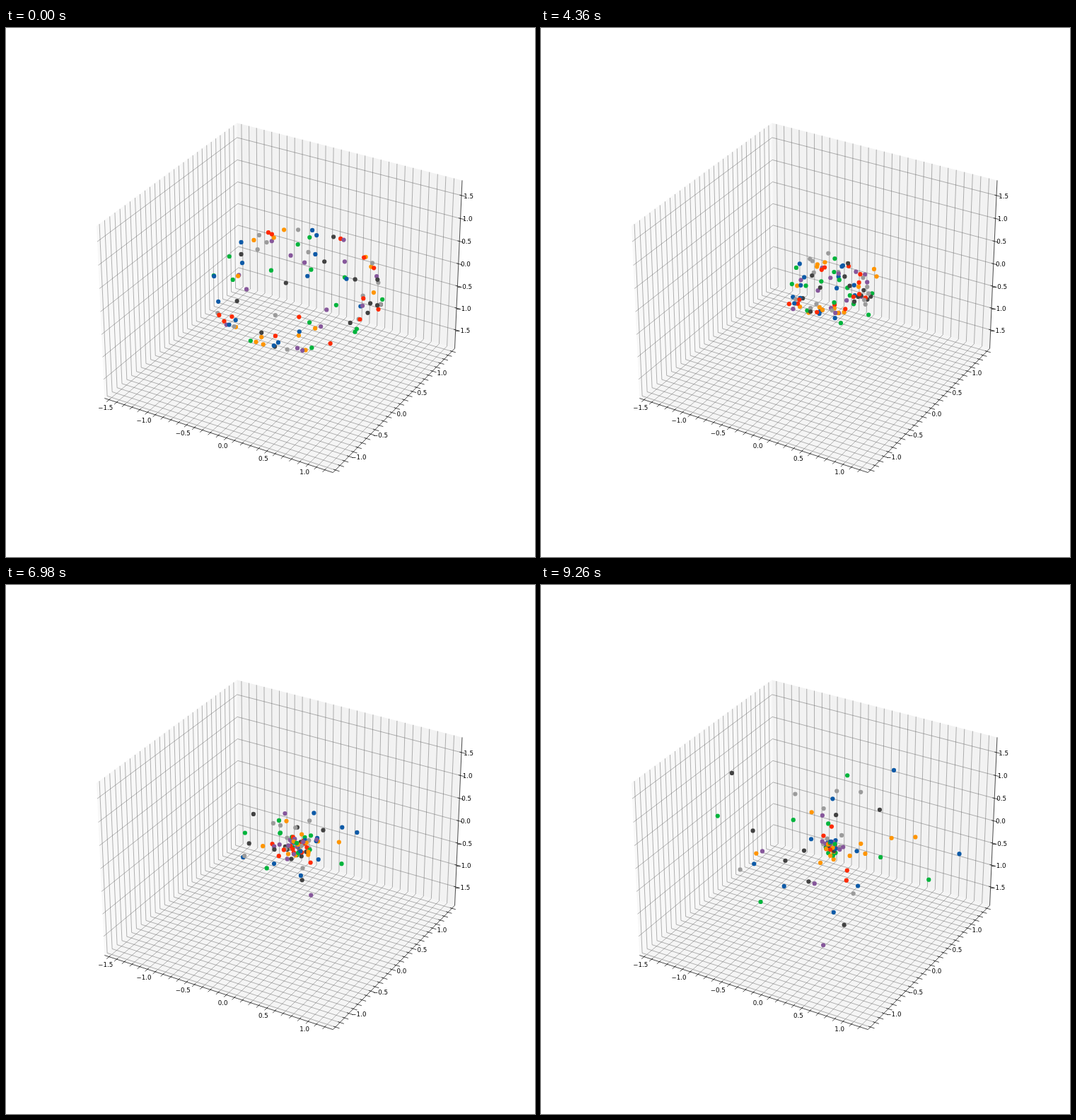
Animation, 748 px wide and 748 px high, one loop 9280 ms. Source, as an HTML page with a canvas:

```html
<!DOCTYPE html>
<html>
<head>
<meta charset="utf-8">
<style>
  html, body { margin: 0; width: 100%; height: 100%; overflow: hidden; background: #fff; }
  canvas { display: block; }
</style>
</head>
<body>
<canvas id="stage" width="748" height="748"></canvas>
<script>
const ctx = document.getElementById('stage').getContext('2d');
const LOOP = 9280;
const COLORS = ['#00b43c', '#0d5aa7', '#86579b', '#ff9500', '#424242', '#9b9b9b', '#ff2a00'];
const clamp = v => Math.min(1, Math.max(0, v));
const mix = (a, b, t) => a + (b - a) * t;

// Perspective box, seen from elevation 30 and azimuth -60; a, b, c run from 0 to 1.
function project(a, b, c) {
  const x = (a - .5) * 1.1434, y = (b - .5) * 1.1434, z = (c - .5) * .8575;
  const k = 3238 / (10 - (.433 * x - .75 * y + .5 * z));
  return [391.3 + k * (.866 * x + .5 * y), 370 - k * (-.25 * x + .433 * y + .866 * z)];
}

function trace(points, width, color) {
  ctx.beginPath();
  points.forEach(p => ctx.lineTo(...project(...p)));
  ctx.lineWidth = width;
  ctx.strokeStyle = color;
  ctx.stroke();
}

function pane(color, ...corners) {
  ctx.beginPath();
  corners.forEach(p => ctx.lineTo(...project(...p)));
  ctx.fillStyle = color;
  ctx.fill();
}

const axes = [
  { min: -1.56, max: 1.298, step: .1, dx: -5, dy: 12,
    at: f => [f, 0, 0], out: [0, -1, 0],
    grid: f => [[f, 0, 0], [f, 1, 0], [f, 1, 1]] },
  { min: -1.455, max: 1.475, step: .1, dx: 7.8, dy: 8.8,
    at: f => [1, f, 0], out: [1, 0, 0],
    grid: f => [[1, f, 0], [0, f, 0], [0, f, 1]] },
  { min: -1.93, max: 1.826, step: .5, dx: 10, dy: 1.5,
    at: f => [1, 1, f], out: [1, 0, 0],
    grid: f => [[0, 0, f], [0, 1, f], [1, 1, f]] }
];
const fraction = (axis, value) => (value - axis.min) / (axis.max - axis.min);

function eachTick(axis, draw) {
  const last = Math.floor(axis.max / axis.step);
  for (let i = Math.ceil(axis.min / axis.step); i <= last; i++) {
    draw(fraction(axis, i * axis.step), i * axis.step);
  }
}

function drawBox() {
  ctx.fillStyle = '#fff';
  ctx.fillRect(0, 0, 748, 748);
  pane('#f8f8f8', [0, 0, 0], [0, 1, 0], [0, 1, 1], [0, 0, 1]);
  pane('#f2f2f2', [0, 1, 0], [1, 1, 0], [1, 1, 1], [0, 1, 1]);
  pane('#f5f5f5', [0, 0, 0], [1, 0, 0], [1, 1, 0], [0, 1, 0]);
  for (const axis of axes) {
    eachTick(axis, f => trace(axis.grid(f), .5, '#666'));
  }
  ctx.font = '8.66px "DejaVu Sans", sans-serif';
  ctx.textAlign = 'center';
  ctx.textBaseline = 'middle';
  for (const axis of axes) {
    trace([axis.at(0), axis.at(1)], .7, '#000');
    eachTick(axis, (f, value) => {
      const p = axis.at(f);
      const shift = s => p.map((v, i) => v + s * axis.out[i]);
      trace([shift(-.1 / 12), shift(.2 / 12)], .7, '#000');
      const halves = value * 2;
      if (Math.abs(halves - Math.round(halves)) > .01) return;
      const [x, y] = project(...p);
      const sign = halves < -.01 ? '\u2212' : '';
      ctx.fillStyle = '#000';
      ctx.fillText(sign + Math.abs(value).toFixed(1), x + axis.dx, y + axis.dy);
    });
  }
}

let seed = 2024;
function random() {
  seed = (seed * 16807) % 2147483647;
  return seed / 2147483647;
}

function onSphere(z, turn) {
  const r = Math.sqrt(1 - z * z);
  return [r * Math.cos(turn), r * Math.sin(turn), z];
}
const anyDirection = () => onSphere(2 * random() - 1, 2 * Math.PI * random());

// Dots rest on a sphere; about half of them shoot out on the far side after the collapse.
const COUNT = 100;
const dots = Array.from({ length: COUNT }, (_, i) => {
  const start = onSphere(1 - 2 * (i + random()) / COUNT, 2 * Math.PI * random());
  const scatter = anyDirection();
  const exit = start.map((v, k) => .9 * scatter[k] - v);
  const reach = random() < .52 ? .2 + 1.6 * random() : 0;
  const scale = reach / Math.hypot(...exit);
  return {
    color: COLORS[i % COLORS.length],
    start: start.map(v => .95 * v),
    exit: exit.map(v => v * scale),
    fall: 105 + 20 * random() ** 2,
    swing: .3 + random(),
    phases: start.map(() => 7 * random()),
    spin: .24 * (random() - .5)
  };
});

// Free fall from rest: 1 at the start, 0 at the centre.
function freeFall(part) {
  if (part >= 1) return 0;
  let lo = 0, hi = Math.PI / 2;
  for (let i = 0; i < 24; i++) {
    const mid = (lo + hi) / 2;
    if (mid + Math.sin(2 * mid) / 2 < part * Math.PI / 2) lo = mid; else hi = mid;
  }
  return Math.cos(lo) ** 2;
}

function drawDot(dot, step) {
  const fall = freeFall(step / dot.fall);
  const away = clamp((step - 111) / 88) ** .9;
  const stir = clamp((step - 82) / 36);
  const core = stir * stir * (3 - 2 * stir) * mix(.21, .08, clamp((step - 125) / 60));
  const place = axes.map((axis, k) => {
    const wobble = core * dot.swing * Math.sin(dot.phases[k] + dot.spin * step);
    return fraction(axis, .03 + dot.start[k] * fall + dot.exit[k] * away + wobble);
  });
  ctx.beginPath();
  ctx.arc(...project(...place), 3.1, 0, 2 * Math.PI);
  ctx.fillStyle = dot.color;
  ctx.fill();
}

// Three steps every 140 ms, held for 20, 100 and 20 ms.
function stepAt(ms) {
  const rest = ms % 140;
  return 3 * Math.floor(ms / 140) + (rest < 20 ? 0 : rest < 120 ? 1 : 2);
}

const begin = performance.now();
function frame() {
  const step = stepAt((performance.now() - begin) % LOOP);
  drawBox();
  dots.forEach(dot => drawDot(dot, step));
  requestAnimationFrame(frame);
}
frame();
</script>
</body>
</html>
```
